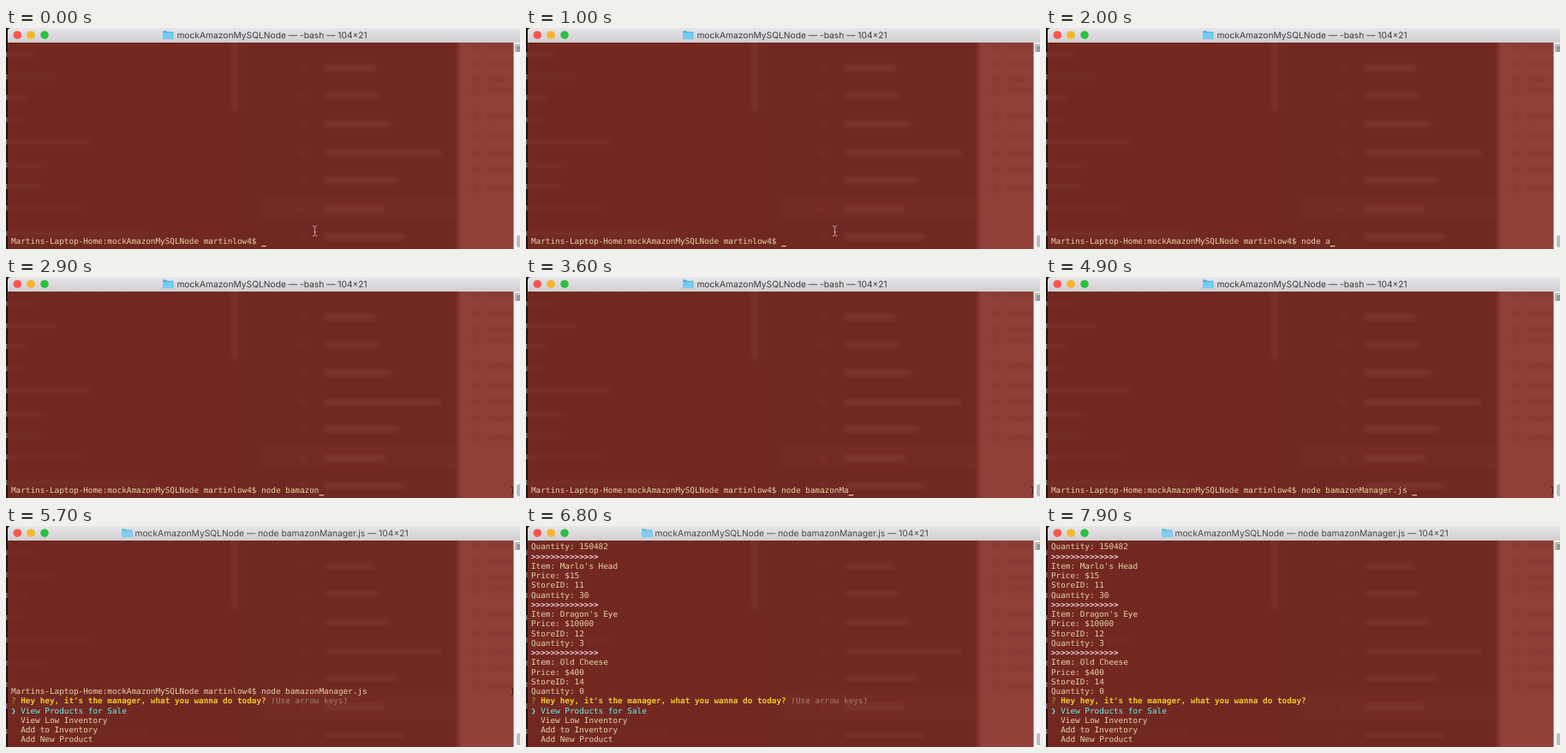
Write an HTML page that moves like this. It is 600 px wide and 258 px high and loops after 8000 ms.

```html
<!DOCTYPE html>
<html lang="en">
<head>
<meta charset="utf-8">
<title>Terminal</title>
<style>
  html, body { margin: 0; width: 100%; height: 100%; overflow: hidden; background: #1b1214; }
  svg { display: block; width: 600px; height: 258px; }
  text { white-space: pre; text-rendering: geometricPrecision; }
  #rows text { font: 9.33px "DejaVu Sans Mono", monospace; fill: #e6d3a8; }
  #title { font: 10.25px Inter, sans-serif; }
  #rows .ask { fill: #ecc92c; font-weight: bold; }
  #rows .mark { fill: #8fc02c; }
  #rows .hint { fill: #a27f68; }
  #rows .pick { fill: #62f0f2; }
  #rows .rule { fill: #f5cfe2; font-weight: bold; }
</style>
</head>
<body>
<svg viewBox="0 0 600 258">
  <defs>
    <linearGradient id="bar" x1="0" y1="0" x2="0" y2="1">
      <stop offset="0" stop-color="#e8e6e8"/>
      <stop offset="1" stop-color="#d0ced0"/>
    </linearGradient>
    <filter id="soft" x="-5%" y="-5%" width="110%" height="110%" color-interpolation-filters="sRGB">
      <feGaussianBlur stdDeviation="2.4"/>
    </filter>
    <clipPath id="inside"><path d="M2 17H592.500V258H2Z"/></clipPath>
  </defs>

  <path d="M0 16H2V258H0Z" fill="#1b1214"/>
  <g clip-path="url(#inside)">
    <path d="M2 17H593V258H2Z" fill="#722821"/>
    <g filter="url(#soft)">
      <path d="M262 10H271V97H262Z" fill="#79312a"/>
      <path d="M272 10H528V270H272Z" fill="#702822"/>
      <path d="M299 196H525V225H299Z" fill="#742b24"/>
      <path d="M528 0H620V280H528Z" fill="#904038"/>
    </g>
    <g id="blurs" filter="url(#soft)"></g>
  </g>
  <g id="edge" fill="#a9a0a0"></g>

  <path d="M592.500 17H600V258H592.500Z" fill="#f7f6f6"/>
  <path d="M594.500 19.500H601V27.500H594.500Z" fill="#d2d0d0" stroke="#8b8888" stroke-width=".7"/>
  <path d="M596 22H600M596 24H600M596 26H600" stroke="#4c4949" stroke-width=".9"/>
  <rect x="596" y="242" width="6" height="14" rx="2.500" fill="#bdbbbb"/>

  <path d="M2 17V4Q2 0 6 0H600V17Z" fill="url(#bar)"/>
  <circle cx="13.300" cy="8.200" r="4.800" fill="#fb5550"/>
  <circle cx="29.100" cy="8.200" r="4.800" fill="#f6b52c"/>
  <circle cx="45" cy="8.200" r="4.800" fill="#2ac03f"/>
  <g id="folder">
    <path d="M0 1Q0 0 1 0H4.200L5.400 1.300H11.500Q12.500 1.300 12.500 2.300V9.200H0Z" fill="#4fb4e2"/>
    <path d="M0 2.600H12.500V9Q12.500 10 11.500 10H1Q0 10 0 9Z" fill="#74ccf2"/>
  </g>
  <text id="title" y="12"></text>

  <g id="rows"></g>
  <path id="bracket" d="M-2 -7H0V1H-2" fill="none" stroke="#3f1a16"/>
  <rect id="cursor" width="5.600" height="1" y="254.200" fill="#f4ead8"/>
  <path id="beam" d="M357.800 231Q360.500 231 360.500 233V241Q360.500 243 357.800 243M363.200 231Q360.500 231 360.500 233M363.200 243Q360.500 243 360.500 241M359 238H362"
    fill="none" stroke="#c9a5a0" stroke-width=".9"/>
</svg>
<script>
const LOOP = 8000, LEFT = 6, CELL = 5.617, LINE = 11.25, BASE = 252.3;
const NS = "http://www.w3.org/2000/svg";
const $ = id => document.getElementById(id);

function add(parent, tag, attrs, text = "") {
  const el = document.createElementNS(NS, tag);
  for (const key in attrs) el.setAttribute(key, attrs[key]);
  el.textContent = text;
  parent.append(el);
  return el;
}

// Blurred lines seen through the window: x, y, width
function smear(lines, height, fill, opacity) {
  for (const [x, y, width] of lines)
    add($("blurs"), "rect", { x, y: y - height / 2, width, height, rx: 2, fill, opacity });
}
const listRows = [[372, 47, 60], [372, 79, 64], [372, 112, 78], [372, 146, 136],
  [372, 178, 86], [372, 211, 70], [372, 244, 94]];
smear(listRows, 7, "#bd817a", .15);
smear(listRows.map(([, y]) => [343, y, 8]), 6, "#bd817a", .08);
const sideLines = [[0, 31, 34], [0, 57, 58], [0, 81, 27], [0, 107, 20], [0, 133, 100],
  [0, 160, 48], [0, 185, 40], [0, 210, 88], [0, 240, 165]];
smear(sideLines, 7, "#96564d", .13);
for (const [, y] of sideLines)
  add($("edge"), "rect", { x: 0, y: y - 3, width: 1.6, height: 6, opacity: .55 });
const panelRows = [22, 42, 60, 73, 103, 126, 146, 165, 187];
smear(panelRows.map(y => [561, y, 30]), 6, "#5e221d", .2);
smear(panelRows.map(y => [545, y, 9]), 9, "#5e221d", .17);

const prompt = "Martins-Laptop-Home:mockAmazonMySQLNode martinlow4$ ";
const command = "node bamazonManager.js ";

// Typed input: time, text
const typing = [[0, ""], [1100, "n"], [1200, "no"], [1350, "nod"], [1500, "node"],
  [1650, "node "], [1900, "node a"], [2100, "node "], [2200, "node b"],
  [2300, "node ba"], [2400, "node bam"], [2500, "node bama"], [2600, "node bamaz"],
  [2700, "node bamazo"], [2800, "node bamazon"], [3300, "node bamazonM"],
  [3500, "node bamazonMa"], [3800, command]];
const ENTER = 5000, MENU = 5400, LISTED = 6300, HINT_OFF = 7700;

const plain = text => [[text]];
const item = (name, price, id, count) => [
  [[">".repeat(14), "rule"]],
  ...["Item: " + name, "Price: $" + price, "StoreID: " + id, "Quantity: " + count].map(plain)
];
const products = [
  plain("Quantity: 150482"),
  ...item("Marlo's Head", 15, 11, 30),
  ...item("Dragon's Eye", 10000, 12, 3),
  ...item("Old Cheese", 400, 14, 0)
];
const menu = hint => [
  [["? ", "mark"], ["Hey hey, it's the manager, what you wanna do today? ", "ask"],
    [hint ? "(Use arrow keys)" : "", "hint"]],
  [["❯ ", "pick"], ["View Products for Sale", "pick"]],
  ...["View Low Inventory", "Add to Inventory", "Add New Product"].map(s => plain("  " + s))
];

function screenAt(t) {
  if (t >= LISTED) return [...products, ...menu(t < HINT_OFF)];
  if (t >= MENU) return [plain(prompt + command), ...menu(true)];
  if (t >= ENTER) return [plain(prompt + command), plain("")];
  return [plain(prompt + typing.findLast(step => step[0] <= t)[1])];
}

function drawRows(rows) {
  $("rows").replaceChildren();
  rows.forEach((spans, i) => {
    const y = BASE - (rows.length - 1 - i) * LINE;
    const line = add($("rows"), "text", { y });
    let col = 0;
    for (const [text, kind = ""] of spans) {
      add(line, "tspan", { x: LEFT + col * CELL, class: kind }, text);
      col += text.length;
    }
  });
}

function show(id, on) { $(id).style.display = on ? "" : "none"; }

let shown = "";
function draw(now) {
  const t = now % LOOP;
  const rows = screenAt(t);
  const running = t >= ENTER;
  const key = JSON.stringify(rows);
  if (key !== shown) {
    drawRows(rows);
    shown = key;
  }

  $("title").setAttribute("x", running ? 150.5 : 199.4);
  $("title").textContent = `mockAmazonMySQLNode — ${running ? "node bamazonManager.js" : "-bash"} — 104×21`;
  $("title").style.fill = running ? "#4a484a" : "#3c3a3c";
  $("folder").setAttribute("transform", `translate(${running ? 135 : 183} 3.2)`);
  $("folder").setAttribute("opacity", running ? .85 : 1);
  $("blurs").setAttribute("opacity", t >= MENU ? .85 : 1);

  const typed = rows[rows.length - 1][0][0].length;
  $("cursor").setAttribute("x", LEFT + typed * CELL);
  show("cursor", t < MENU);
  show("beam", t < 1100);

  const promptY = BASE - (rows.length - 1) * LINE;
  $("bracket").setAttribute("transform", `translate(591.5 ${promptY})`);
  show("bracket", t >= 2400 && t < LISTED);
}

function tick() {
  draw(performance.now());
  requestAnimationFrame(tick);
}
tick();
</script>
</body>
</html>
```
